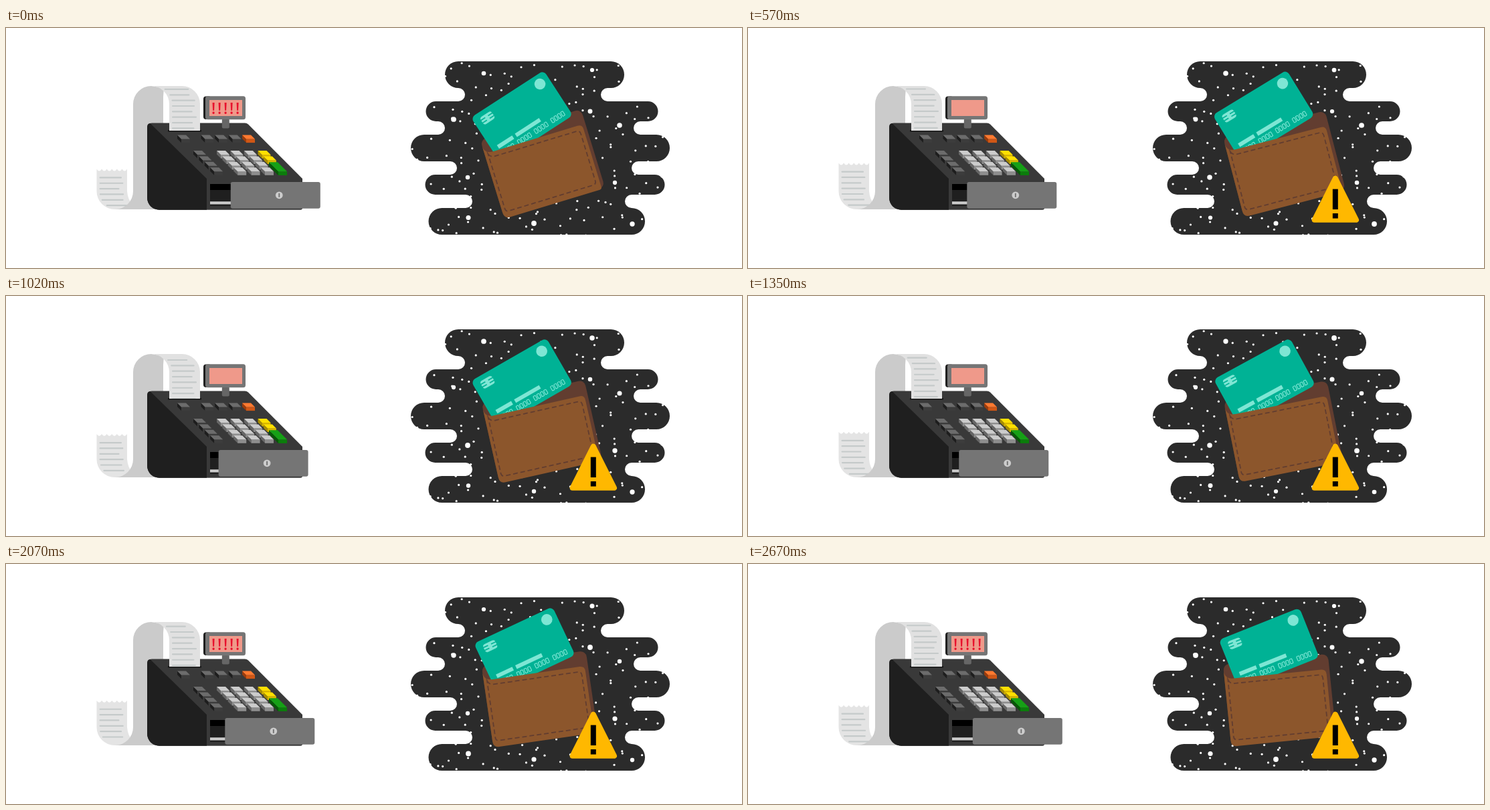
An HTML page with a canvas that plays this animation: 1100x360 px, repeating every 2700 ms.

```html
<!DOCTYPE html>
<html lang="en">
<head>
<meta charset="utf-8">
<title>Cash register and wallet</title>
<style>
html, body { margin: 0; width: 100%; height: 100%; overflow: hidden; background: #fff; }
canvas { display: block; width: 1100px; height: 360px; }
</style>
</head>
<body>
<canvas id="stage"></canvas>
<script>
const canvas = document.getElementById('stage');
const ctx = canvas.getContext('2d');
const dpr = window.devicePixelRatio || 1;
canvas.width = 1100 * dpr;
canvas.height = 360 * dpr;

const LOOP = 2700;
const TAU = Math.PI * 2;
const Q = Math.PI / 2;
const GAP = 8.35;

const rad = deg => deg * Math.PI / 180;
const turn = t => TAU * t / LOOP;

// Seeded random numbers
function random(seed) {
  return () => (seed = (seed * 16807) % 2147483647) / 2147483647;
}

function rect(x, y, w, h, color, r = 0) {
  ctx.fillStyle = color;
  ctx.beginPath();
  ctx.roundRect(x, y, w, h, r);
  ctx.fill();
}

function dot(x, y, r, color) {
  ctx.fillStyle = color;
  ctx.beginPath();
  ctx.arc(x, y, r, 0, TAU);
  ctx.fill();
}

function poly(color, ...p) {
  ctx.fillStyle = color;
  ctx.beginPath();
  for (let i = 0; i < p.length; i += 2) ctx.lineTo(p[i], p[i + 1]);
  ctx.closePath();
  ctx.fill();
}

function shape(d, color) {
  ctx.fillStyle = color;
  ctx.fill(new Path2D(d));
}

// Half width of the paper's bend at a height above or below its centre
function bend(dy) {
  const d = Math.max(0, dy);
  return Math.sqrt(729 - d * d);
}

const printLine = (x, y, n) => rect(x, y - 1.1, 33.5 + 3.5 * Math.sin(n * 2.4), 2.2, '#c5caca', 1);

const paperShift = t =>
  -7.6 * Math.abs(Math.sin(turn(t) / 2)) - 4.1 * Math.sin(2 * turn(t) - 0.3) - 0.8;

function drawRoll(shift) {
  const end = 211 + shift, tooth = 45.5 / 6;
  ctx.fillStyle = '#e4e4e4';
  ctx.beginPath();
  ctx.moveTo(135.5, end);
  for (let x = 135.5; x < 180; x += tooth) {
    ctx.quadraticCurveTo(x + tooth / 2, end + 6, x + tooth, end);
  }
  ctx.lineTo(181, 245);
  ctx.quadraticCurveTo(182, 258, 189, 264);
  ctx.lineTo(180, 272);
  ctx.lineTo(162.5, 272);
  ctx.arc(162.5, 245, 27, Q, Math.PI);
  ctx.fill();
  for (let k = 0, y = end + 13; y < 267; k++, y += GAP) {
    printLine(166.5 - bend(y - 245), y, k);
  }
  shape('M190 114 A27 27 0 0 1 217 87 L236 90 L235 103 V272 H163 A27 27 0 0 0 190 245Z', '#cbcbcb');
}

function drawStrip(shift) {
  const strip = 'M217 87 H263 A27 27 0 0 1 290 114 V154 H244 V114 A27 27 0 0 0 217 87Z';
  rect(242, 153, 50, 2.4, '#161616');
  shape(strip, '#e1e1e1');
  ctx.save();
  ctx.clip(new Path2D(strip));
  for (let n = -8; n < 3; n++) {
    const y = 150 + n * GAP + shift;
    if (y > 90) printLine(221 + bend(114 - y), y, n);
  }
  ctx.restore();
}

function key(x, y, [top, front, side], d = 6) {
  const w = 13, h = 5.6;
  poly(side, x, y, x + d, y + d, x + d, y + d + h, x, y + h);
  poly(front, x + d, y + d, x + d + w, y + d, x + d + w, y + d + h, x + d, y + d + h);
  poly(top, x, y, x + w, y, x + d + w, y + d, x + d, y + d);
}

function drawKeys() {
  const dark = ['#6c6c6c', '#3c3c3c', '#1d1d1d'];
  const light = ['#cccccc', '#8e8e8e', '#666666'];
  const yellow = ['#ffe000', '#d8b500', '#a88c00'];
  key(256, 160.5, dark);
  for (let c = 0; c < 3; c++) key(291.5 + c * 20.6, 160.5, dark);
  key(353, 160.5, ['#ff7a30', '#cf5716', '#9c3c0c']);
  for (let r = 0; r < 4; r++) {
    const s = r * 8.4;
    key(280 + s, 184 + s, dark);
    for (let c = 0; c < 3; c++) key(315 + s + c * 20.4, 184 + s, light);
    if (r < 2) key(376.5 + s, 184 + s, yellow);
  }
  key(393, 201.3, ['#16a016', '#0b7d0b', '#075807'], 14);
}

function drawDisplay(t) {
  rect(322.8, 136, 11, 14.5, '#666666', 2);
  rect(295, 102.5, 12, 34.5, '#1f1f1f', 4);
  rect(298, 102.2, 60, 35, '#757575', 3.5);
  rect(304, 108, 49, 24, '#ef998a');
  if (t > 420 && t < 1860) return;
  ctx.fillStyle = '#e8112d';
  ctx.font = '600 22.5px "Open Sans", sans-serif';
  ctx.textAlign = 'center';
  for (let i = 0; i < 5; i++) ctx.fillText('!', 310.2 + i * 9, 128.8);
}

function drawDrawer(t) {
  const x = 398 + 10.3 * Math.cos(turn(t + 30));
  rect(305, 234, 60, 33, '#1f1f1f');
  rect(305, 234, 60, 9, '#000');
  rect(305, 260.3, 60, 4.2, '#cccccc');
  rect(x - 72.5, 231, 134, 39.7, '#757575', 3);
  dot(x, 250.8, 5.4, '#cccccc');
  rect(x - 0.9, 247.8, 1.8, 6, '#6c6c6c');
}

function drawRegister(t) {
  const shift = paperShift(t);
  drawRoll(shift);
  shape('M211 149 Q211 142.5 218 142.5 H357 Q360 142.5 362 144.5 L443 226 V270 Q443 272.7 440 272.7 H229 A18 18 0 0 1 211 254.7Z', '#393939');
  shape('M211 149 Q211 143 215.5 143 L300 226 V272.7 H229 A18 18 0 0 1 211 254.7Z', '#1f1f1f');
  drawStrip(shift);
  drawDisplay(t);
  drawKeys();
  drawDrawer(t);
}

function drawCloud() {
  // top, left, right, radius of each band
  const bands = [[50, 656, 924, 20], [110, 627.5, 974.5, 15], [160, 605, 992, 20], [220, 626.5, 984.5, 15], [270, 631.5, 955, 20]];
  // middle, left end, right end of each gap
  const gaps = [[100, 686, 889], [150, 656, 938], [210, 674, 935], [260, 697, 925]];
  ctx.fillStyle = '#2b2b2b';
  ctx.beginPath();
  bands.forEach(([y, l, , r], i) => {
    ctx.arc(l + r, y + r, r, -Q, Q, true);
    if (i < 4) ctx.arc(gaps[i][1] - 10, gaps[i][0], 10, -Q, Q);
  });
  for (let i = 4; i >= 0; i--) {
    const [y, , x, r] = bands[i];
    ctx.arc(x - r, y + r, r, Q, -Q, true);
    if (i) ctx.arc(gaps[i - 1][2] + 10, gaps[i - 1][0], 10, Q, -Q);
  }
  ctx.fill();
}

function drawStars(t) {
  const rnd = random(4711), cell = 21;
  for (let y = 50; y < 310; y += cell) {
    for (let x = 605; x < 990; x += cell) {
      dot(x + cell * rnd(), y + cell * rnd(), 1.6, '#fff');
    }
  }
  const big = [[714, 68], [876, 63], [873, 125], [669, 137], [917, 146], [690, 224], [910, 232], [691, 284.5], [789, 293], [936, 294]];
  big.forEach(([x, y], i) => dot(x, y, 3.5 + 0.4 * Math.cos(turn(t) - 2 - i * 1.3), '#fff'));
}

function drawCard(s) {
  const teal = '#00b295', mint = '#7ee6d4';
  ctx.save();
  ctx.translate(798 + 17 * Math.pow(s, 1.9), 84 - 1.5 * Math.sin(Math.PI * s) + 0.5 * s);
  ctx.rotate(rad(-33 + 6.1 * s + 5.3 * s * s));
  rect(-114, -14, 129.8, 80.3, teal, 7);
  dot(0, 0, 8.3, mint);

  // chip
  rect(-103.5, -6.5, 20, 13, mint, 4);
  for (const y of [-2.3, 2.3]) {
    rect(-104, y - 0.8, 8, 1.6, teal);
    rect(-91, y - 0.8, 8, 1.6, teal);
  }

  rect(-104, 42, 27, 6, mint);
  rect(-72, 42, 43, 6, mint);
  ctx.strokeStyle = mint;
  ctx.lineWidth = 1.1;
  for (let g = 0; g < 4; g++) {
    for (let i = 0; i < 4; i++) {
      ctx.beginPath();
      ctx.roundRect(-104.5 + g * 29.6 + i * 6, 52.5, 4, 7, 1);
      ctx.stroke();
    }
  }
  ctx.restore();
}

function drawWallet(s) {
  const place = () => {
    ctx.save();
    ctx.translate(798 + 2 * Math.sin(Math.PI * s), 165 - 1.9 * Math.sin(Math.PI * s * s) + 0.6 * s);
    ctx.rotate(rad(-17 + 11.4 * s));
    ctx.translate(-86.2, -1.1);
  };
  place();
  rect(0, -22.5, 157.5, 122.5, '#623d30', 9);
  ctx.restore();

  drawCard(s);

  place();
  shape('M0 -13 C0 -4 5 0 14 0 H145 Q152.5 0 152.5 7.5 V98 Q152.5 101.5 149 101.5 H9 Q0 101.5 0 92.5Z', '#8c562c');
  ctx.strokeStyle = '#623d30';
  ctx.lineWidth = 1.8;
  ctx.setLineDash([7, 4]);
  ctx.stroke(new Path2D('M5 1 Q7 7.5 14 7.5 H141 Q146.5 7.5 146.5 13 V87 Q146.5 92 141 92 H10 Q5 92 5 87Z'));
  ctx.restore();
}

// Quick growth past full size, then a soft settle
function popScale(t) {
  if (t < 190) return 1.29 * Math.sin(Q * t / 190);
  if (t < 480) return 1.145 + 0.145 * Math.cos(Math.PI * (t - 190) / 290);
  return 1;
}

function drawWarning(t) {
  const k = popScale(t);
  if (k <= 0) return;
  ctx.save();
  ctx.translate(877.8, 256.8);
  ctx.scale(k, k);
  ctx.fillStyle = ctx.strokeStyle = '#ffb800';
  ctx.lineJoin = 'round';
  ctx.lineWidth = 8;
  ctx.beginPath();
  ctx.moveTo(0, -31.2);
  ctx.lineTo(31.2, 31);
  ctx.lineTo(-31.2, 31);
  ctx.closePath();
  ctx.fill();
  ctx.stroke();
  rect(-4, -15.2, 8, 30.5, '#000');
  rect(-4, 21.2, 8, 7.6, '#000');
  ctx.restore();
}

function draw(t) {
  ctx.setTransform(dpr, 0, 0, dpr, 0, 0);
  ctx.fillStyle = '#fff';
  ctx.fillRect(0, 0, 1100, 360);
  drawRegister(t);
  drawCloud();
  drawStars(t);
  drawWallet(t / LOOP);
  drawWarning(t);
}

let start = null;
function tick(now) {
  if (start === null) start = now;
  // advance in steps of 30 ms
  draw(Math.floor((now - start) / 30) * 30 % LOOP);
  requestAnimationFrame(tick);
}
requestAnimationFrame(tick);
</script>
</body>
</html>
```
